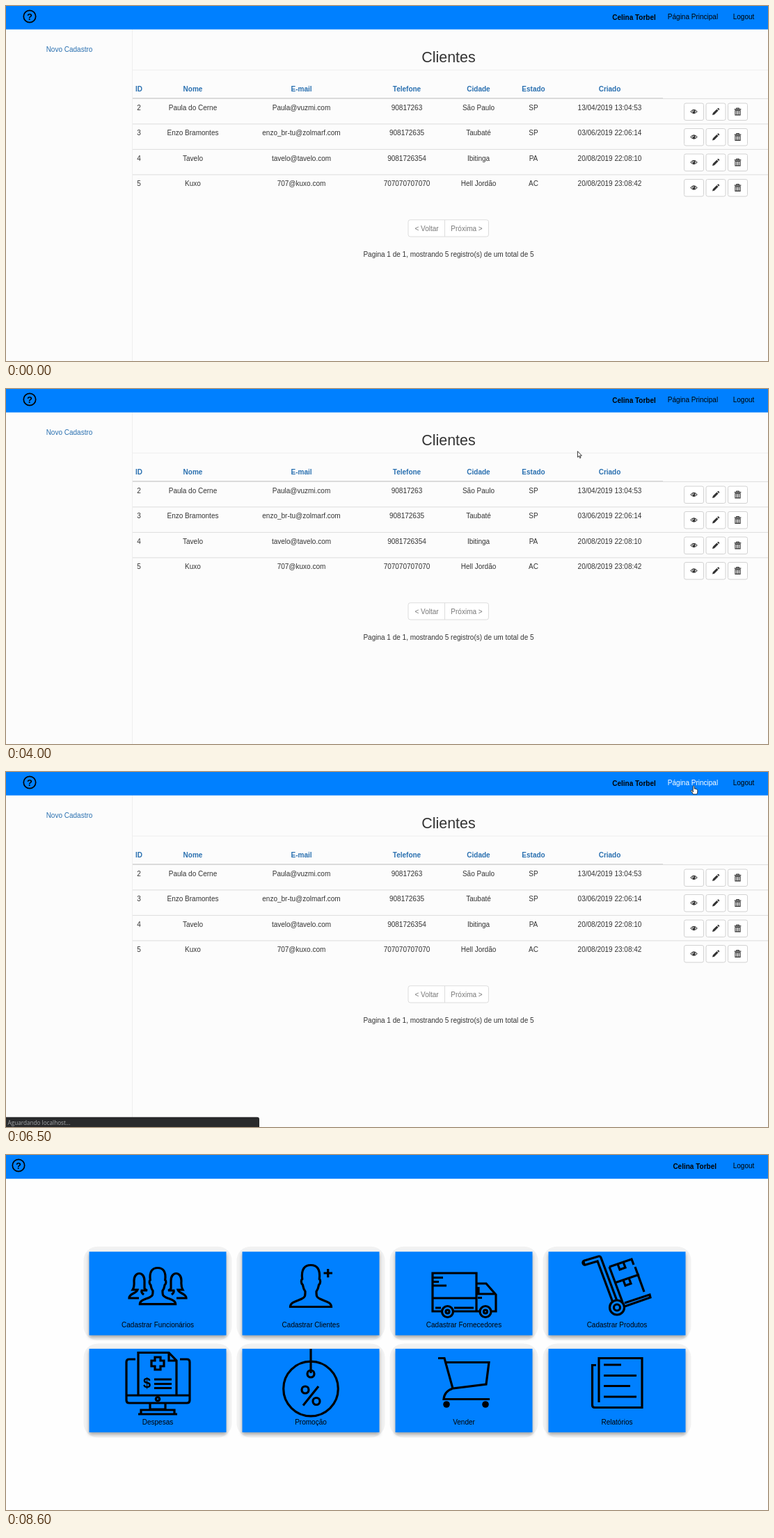
An HTML page that plays this animation: 1095 px wide and 511 px high, repeating every 9400 ms.

```html
<!DOCTYPE html>
<html lang="pt">
<head>
<meta charset="utf-8">
<style>
html, body { margin: 0; width: 100%; height: 100%; overflow: hidden; background: #fcfcfc; }
svg { display: block; }
text { font: 10px "Liberation Sans", Arial, sans-serif; fill: #333; text-anchor: middle; }
.bold { font-weight: bold; }
.dark { fill: #000; }
.link { fill: #2a70b0; }
.muted { fill: #777; }
.status { font: 8.2px "Open Sans", sans-serif; fill: #a5a8ab; text-anchor: start; }
.card { filter: drop-shadow(0 3px 2.5px rgba(0, 0, 0, .32)); }
.icon { fill: none; stroke: #000; stroke-width: 3.2; }
</style>
</head>
<body>
<svg id="stage" width="1095" height="511" viewBox="0 0 1095 511"></svg>
<script>
const LOOP = 9400, BLUE = '#0080ff';
const stage = document.getElementById('stage');

// Text is centred on (x, y).
const text = (x, y, s, cls = '', attrs = '') =>
  `<text x="${x}" y="${y + 3.6}" class="${cls}" ${attrs}>${s.replace('<', '&lt;').replace('>', '&gt;')}</text>`;
const rect = (x, y, w, h, attrs) => `<rect x="${x}" y="${y}" width="${w}" height="${h}" ${attrs}/>`;
const path = (d, attrs = '') => `<path d="${d}" ${attrs}/>`;
const circle = (x, y, r, attrs = '') => `<circle cx="${x}" cy="${y}" r="${r}" ${attrs}/>`;
const mirrored = (x, shape) => shape + `<g transform="translate(${2 * x} 0) scale(-1 1)">${shape}</g>`;

function header(height, helpX, nameX) {
  return rect(0, 0, 1095, height, `fill="${BLUE}"`) +
    circle(helpX, 15, 8.7, 'fill="none" stroke="#000" stroke-width="1.7"') +
    text(helpX, 16.2, '?', 'bold dark', 'style="font-size:13px"') +
    text(nameX, 16, 'Celina Torbel', 'bold dark') +
    text(1060, 15, 'Logout', 'dark');
}

function actions(y) {
  const button = x => rect(x - 14, y - 12, 28, 24.5, 'rx="2.5" fill="#fff" stroke="#d2d2d2"');
  return button(988.5) + button(1020) + button(1051.5) +
    `<g transform="translate(988.5 ${y})">` +
    path('M-5.2 0Q0-6.6 5.2 0Q0 6.6-5.2 0Z', 'fill="#333"') +
    path('M-3.7 0Q-3-1.6-2-2Q-2.6 0-1.6 1.8Q-3 1.4-3.7 0ZM3.7 0Q3-1.6 2-2Q2.6 0 1.6 1.8Q3 1.4 3.7 0Z', 'fill="#fff"') +
    circle(-.6, -.9, .8, 'fill="#fff"') + '</g>' +
    `<g transform="translate(1020 ${y})">` +
    path('M-5 5L-4.2 2L1.4-3.6L3.6-1.4L-2 4.2ZM2.1-4.2L3-5.1Q3.6-5.4 5-4Q5.4-3.6 5.1-3L4.2-2.1Z', 'fill="#333"') + '</g>' +
    `<g transform="translate(1051.5 ${y})" fill="none" stroke="#333">` +
    path('M-4.8-3.4H4.8M-1.7-3.6V-5H1.7V-3.6M-3.6-1.6V4.9H3.6V-1.6ZM-1.3-1.5V4.5M1.3-1.5V4.5', 'stroke-width="1.1"') + '</g>';
}

function clientsPage() {
  const columns = [191, 268.5, 424.5, 576, 679, 758, 867.5];
  const titles = ['ID', 'Nome', 'E-mail', 'Telefone', 'Cidade', 'Estado', 'Criado'];
  const rows = [
    ['2', 'Paula do Cerne', 'Paula@vuzmi.com', '90817263', 'São Paulo', 'SP', '13/04/2019 13:04:53'],
    ['3', 'Enzo Bramontes', 'enzo_br-tu@zolmarf.com', '908172635', 'Taubaté', 'SP', '03/06/2019 22:06:14'],
    ['4', 'Tavelo', 'tavelo@tavelo.com', '9081726354', 'Ibitinga', 'PA', '20/08/2019 22:08:10'],
    ['5', 'Kuxo', '707@kuxo.com', '707070707070', 'Hell Jordão', 'AC', '20/08/2019 23:08:42']
  ];
  const line = (x, y, w, h, color) => rect(x, y, w, h, `fill="${color}"`);
  return rect(0, 0, 1095, 511, 'fill="#fcfcfc"') +
    line(181, 33, 1, 478, '#eee') + line(182, 91.6, 913, 1, '#eee') +
    header(33.7, 34, 902.5) +
    text(987, 15, 'Página Principal', 'dark', 'id="home"') +
    text(91, 62, 'Novo Cadastro', 'link') +
    text(636, 77.4, 'Clientes', '', 'style="font-size:21.4px"') +
    titles.map((s, i) => text(columns[i], 119, s, 'bold link')).join('') +
    line(182, 132, 762, 1.4, '#d6d6d6') +
    rows.map((row, r) => {
      const y = 146 + r * 36.5;
      return line(182, y - 13.1, 913, 1, '#ddd') + actions(y + 6) +
        row.map((s, i) => text(columns[i], y, s)).join('');
    }).join('') +
    rect(578, 307.8, 115.5, 24.2, 'rx="3" fill="#fff" stroke="#ddd"') + line(630, 308, 1, 24, '#ddd') +
    text(604.5, 320, '< Voltar', 'muted') + text(662, 320, 'Próxima >', 'muted') +
    text(636, 357, 'Pagina 1 de 1, mostrando 5 registro(s) de um total de 5');
}

const person = mirrored(0, path('M0 60H-29.5C-29.5 53-20 52-13 48.5C-8 46.5-8 44-8 38C-11 34-11 31-11.5 28.5C-14.5 26-14 21-12.3 20C-14 6-9 0 0 0'));

const icons = {
  'Cadastrar Funcionários':
    `<g transform="translate(218 162.5) scale(.87)" stroke-width="3.7">${person}</g>` +
    mirrored(218, path('M191 206H177C177 199 187 200 189 194H182C185 189 184 184 184 181C184 167 199 167 199 181V192Q200 194 203 195L195 195Q194 198 198 201')),
  'Cadastrar Clientes':
    `<g transform="translate(438 158.5)">${person}</g>` + path('M456.5 170H469M462.7 164V176.3'),
  'Cadastrar Fornecedores':
    path('M626 225H613V170H676V225H643M613 206H676M614 176.5H628M614 182.5H622M614 188H633M676 185H690L704 201V225H698M680 225H676M679 190V200H702M678 205.5H684M617 220H625M644 220H672') +
    [634.5, 689].map(x => circle(x, 225.5, 8) + circle(x, 225.5, 2.5)).join(''),
  'Cadastrar Produtos':
    path('M832 155L852 149L875 211', 'stroke-width="9.5" stroke-linejoin="round" stroke-linecap="round"') +
    path('M832 155L852 149L875 211', `stroke="${BLUE}" stroke-width="3.2" stroke-linejoin="round"`) +
    circle(878, 219.5, 10.5, `fill="${BLUE}"`) + circle(878, 219.5, 4.5) +
    path('M889 213L925 201L926 205L889 218M867 161L899 150L902 158M904 161L917 197M867 161L886 212M875 184L910 172M879 157L882 165L890 162L887 154M887 180L890 188L898 185L895 177'),
  'Despesas':
    path('M186 294H177Q173 294 173 298V353Q173 357 177 357H260Q264 357 264 353V298Q264 294 260 294H250M173 346H264M190 346V284.5H234L245 296V346M234 285V296H245M214 291H222V296H227V304H222V309H214V304H209V296H214ZM213 323H238M213 329.5H238M213 335.5H238M207 357V366H229V357M194 373V367H242V373M190 373H246') +
    circle(218, 351.3, 2.7) + text(202.5, 331.7, '$', 'bold dark', 'stroke="none" style="font-size:20px"'),
  'Promoção':
    circle(438, 336.5, 39.3) + path('M438 279V314M427 360.5L449 333') +
    circle(438, 315, 5) + circle(430, 338, 5) + circle(446, 354.5, 5),
  'Vender':
    path('M621 292.5H630L642 336L690 330L694 298.5H632M642 336Q630 340 629 351.5H695') +
    circle(633, 359, 4.8, 'fill="#000" stroke="none"') + circle(689, 359, 4.8, 'fill="#000" stroke="none"'),
  'Relatórios':
    path('M852 356V292.5H914V363.5H846Q842.5 363.5 842.5 360V302.5H848M859 302H884M859 317.5H906M859 332.5H897M859 348H906')
};

function menuPage() {
  const place = i => [119.5 + i % 4 * 220, i < 4 ? 139.2 : 278.9];
  const names = Object.keys(icons);
  const halo = (id, side, top, bottom, radius, color) => `<g id="${id}" fill="${color}">` + names.map((_, i) => {
    const [x, y] = place(i);
    return rect(x - side, y - top, 197 + 2 * side, 120 + top + bottom, `rx="${radius}"`);
  }).join('') + '</g>';
  return rect(0, 0, 1095, 511, 'id="paper"') + header(34.2, 18, 989.7) +
    halo('early', 3.5, 4, 5, 14, '#e9e9e9') + halo('late', 8, 7.5, 7.5, 20, '#f2f2f2') +
    names.map((name, i) => {
      const [x, y] = place(i);
      return rect(x, y, 197, 120.3, `fill="${BLUE}" class="card"`) +
        `<g class="icon">${icons[name]}</g>` +
        text(x + 98.5, y + 105, name, 'dark');
    }).join('');
}

stage.innerHTML =
  `<g id="clients">${clientsPage()}</g><g id="menu">${menuPage()}</g>` +
  `<g id="status">${path('', 'id="bar" fill="#292a2c"')}<text x="2.5" y="507.8" class="status" id="message"></text></g>` +
  '<g id="cursor" fill="#fff" stroke="#222" stroke-width=".9" stroke-linejoin="round">' +
  path('M.4.6V9.2L2.4 7.4L3.7 10.5L5 9.9L3.7 7H6.4Z', 'id="arrow"') +
  path('M.2 9V.6Q1.2-1 2.2.6V4.2Q3.4 3.4 4 4.6Q5.2 4 5.6 5.2Q6.8 4.8 6.8 6.4V9Q6.6 10.4 5.7 12H.4Q-.6 9.8-2.7 7.4Q-2.6 5.6-1 6.6L.2 7.8Z', 'id="hand"') + '</g>';

const $ = id => document.getElementById(id);
const show = (id, on) => $(id).style.display = on ? '' : 'none';

// Cursor positions, each held until the next: [ms, x, y]
const track = [
  [300, 470, 17], [400, 510, 48], [500, 533, 64], [700, 538, 68], [800, 541, 70], [900, 543, 70],
  [2900, 549, 67], [3000, 690, 70], [3100, 797, 75],
  [3300, 812, 80], [3400, 824, 86], [3500, 827, 90], [3600, 822, 90],
  [4000, 821, 89], [4100, 832, 84], [4200, 865, 66], [4300, 910, 45], [4400, 948, 35],
  [4500, 970, 24], [4600, 982, 20], [4700, 987, 20],
  [7200, 900, 24], [7300, 720, 30], [7400, 565, 31],
  [7600, 500, 55], [7700, 420, 88], [7800, 367, 103], [7900, 372, 105],
  [8200, 310, 80], [8300, 180, 30], [8400, 87, -8]
];

function draw(now) {
  const t = now % LOOP, menu = t >= 6900, late = t >= 7200, waiting = t >= 6500;
  show('clients', !menu);
  show('menu', menu);
  show('early', !late);
  show('late', late);
  $('paper').style.fill = late ? '#fefefe' : '#fcfcfc';

  const hand = t >= 4500 && !late;
  $('home').style.fill = hand ? '#fff' : '#000';
  show('hand', hand);
  show('arrow', !hand);
  show('cursor', t >= 300 && t < 8600);
  const [, x, y] = track.filter(k => k[0] <= t).pop() || track[0];
  $('cursor').setAttribute('transform', `translate(${x} ${y})`);

  show('status', t >= 4900 && !late);
  $('status').style.opacity = t < 5000 ? .5 : 1;
  $('bar').setAttribute('d', `M0 496.7H${waiting ? 361 : 120}q3 0 3 3V511H0Z`);
  $('message').textContent = waiting ? 'Aguardando localhost...' : 'localhost/gestor/telaprincipal';
}

function tick() {
  draw(performance.now());
  requestAnimationFrame(tick);
}
tick();
</script>
</body>
</html>
```
